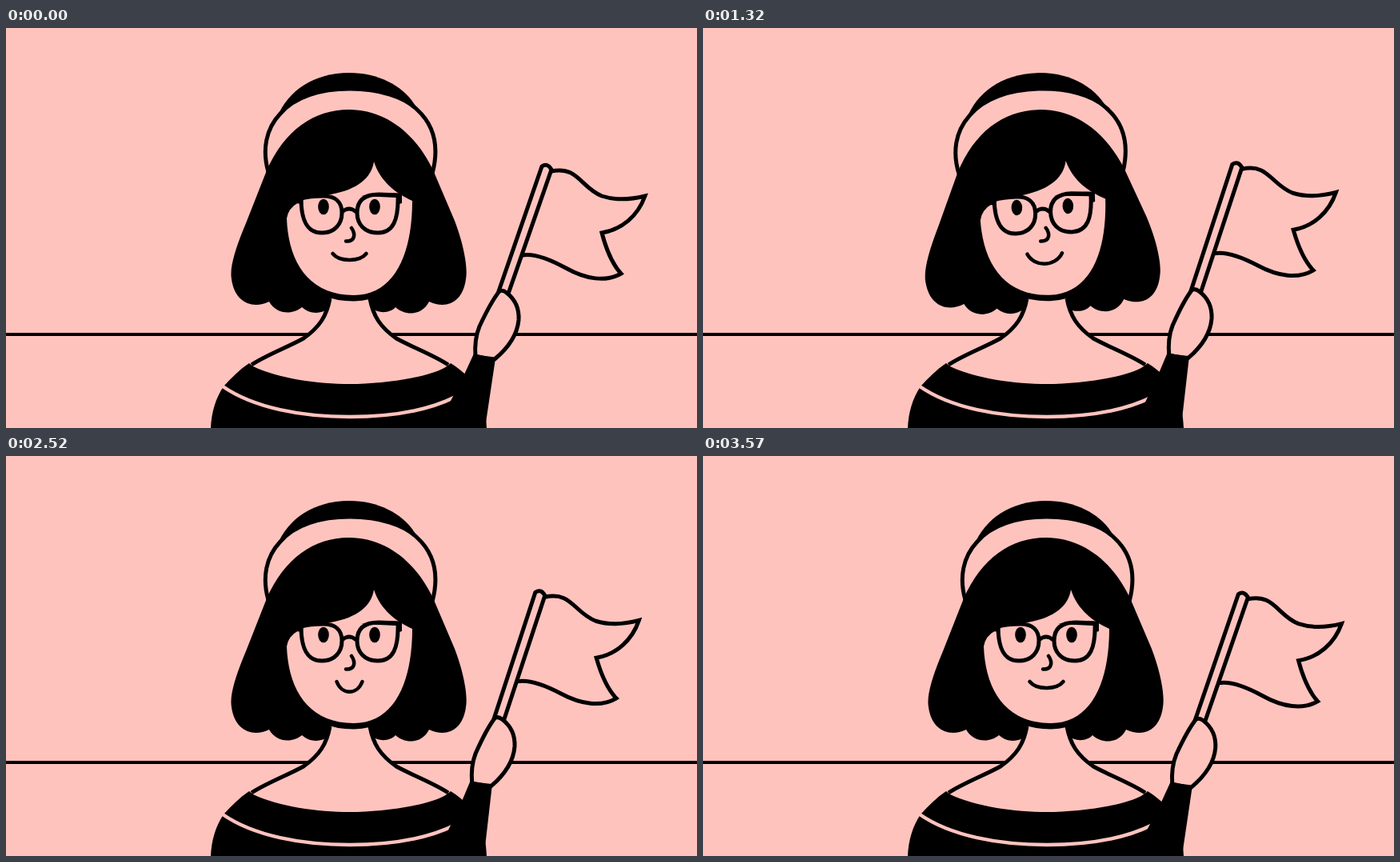
Animation of 864 by 500 pixels, one loop 3600 ms. Source, as an HTML page:

```html
<!DOCTYPE html>
<html lang="en">
<head>
<meta charset="utf-8">
<title>Waving a flag</title>
<style>
  html, body { margin: 0; width: 100%; height: 100%; overflow: hidden; background: #ffc3be; }
  svg { display: block; width: 864px; height: 500px; }
  .line { fill: none; stroke: #000; stroke-width: 5; }
  .skin { fill: #ffc3be; stroke: #000; stroke-width: 5; }
  .round { stroke-linecap: round; }
</style>
</head>
<body>
<svg viewBox="0 0 864 500">
  <path class="line" style="stroke-width:4" d="M0 383H864"/>

  <g class="head">
    <path d="M339 112C352 78 386 56 429 56S505 78 517 107L500 130H350Z"/>
    <path class="skin" d="M328 180C320 152 325 126 343 107C361 86 393 76 430 76S498 86 514 102C538 124 541 152 533 182Z"/>
    <path d="M326 178C348 128 385 102 429 102S512 130 535 180L561 241C571 267 578 298 575 314C571 343 551 352 529 342
      C520 360 499 360 487 349C480 357 465 357 457 350L430 336L404 350C394 358 380 358 370 349
      C358 359 338 358 329 342C308 352 286 343 282 314C279 298 289 270 300 244Z"/>
  </g>

  <path fill="#ffc3be" d="M405 338C401 360 392 374 372 388C350 400 325 409 307 421L430 450L553 421C535 409 510 400 488 388C468 374 459 360 455 338Z"/>
  <path class="line" d="M405 338C401 360 392 374 372 388C350 400 325 409 307 421M455 338C459 360 468 374 488 388C510 400 535 409 553 421"/>
  <path d="M304 419L309 423C340 438 390 445 430 445S530 437 551 423L556 419C590 440 600 468 601 500H256C257 480 262 463 272 448C282 437 292 427 304 419Z"/>
  <path fill="none" stroke="#ffc3be" stroke-width="4.5" d="M271 448C310 475 370 486 430 486S530 477 562 461"/>

  <g class="head">
    <g id="face">
      <path fill="#ffc3be" stroke="#000" stroke-width="15" paint-order="stroke"
        d="M366 218Q353 225 351 238C353 292 378 334 435 334C487 334 508 280 508 216C488 207 468 192 460 167C457 187 440 202 406 208L372 212Z"/>
      <path class="line" d="M369 213C369 240 376 256 395 256C411 256 420 245 420 231C420 218 412 210 397 210C386 210 376 211 369 213Z
        M490 209C491 240 484 256 465 256C448 256 439 245 439 231C439 216 448 208 466 208ZM420 230Q429 222 438 230"/>
      <path d="M444 210Q468 205 495 207V219L488 221V212ZM363 210L374 208L370 220L363 219Z"/>
      <ellipse cx="397" cy="223.5" rx="6.8" ry="9.8"/>
      <ellipse cx="461" cy="223.5" rx="6.8" ry="9.8"/>
    </g>
    <g id="mouth" class="line round" style="stroke-width:4.5">
      <path d="M432 250C437 257 437 267 425 266.5"/>
      <path id="smile"/>
    </g>
  </g>

  <g id="arm">
    <g id="hand">
      <path class="skin" d="M682 179C715 172 718 199 745 210C763 216 783 214 799 210C790 235 770 252 745 256C750 275 758 295 769 307C750 318 725 314 700 300C680 289 660 281 645 284"/>
      <path class="skin" d="M615 332L670 173Q677 168 682 177L627 335Z"/>
      <path class="skin" d="M617 329C608 340 599 358 592 373C587 385 586 398 587 411L611 414C623 404 639 387 641 365C642 349 635 338 626 331Q621 327 617 329Z"/>
    </g>
    <path d="M585 407L573 433L554 470L545 520H596L612 413Z"/>
  </g>
</svg>
<script>
const LOOP = 3600, SWING = 1200;
const byId = id => document.getElementById(id);
const heads = document.querySelectorAll('.head');

const smooth = p => p * p * (3 - 2 * p);

// Eased value at time t through [time, value] keys
function track(keys, t) {
  const next = keys.findIndex(key => key[0] > t);
  if (next < 0) return keys[keys.length - 1][1];
  const [t0, v0] = keys[next - 1], [t1, v1] = keys[next];
  return v0 + (v1 - v0) * smooth((t - t0) / (t1 - t0));
}

// The forearm swings about the elbow; the hand trails it about the wrist
const forearm = [[0, 0], [540, -15.3], [1200, 0]];
const wrist = [[0, 0], [330, 3.3], [900, -5.5], [1180, 0]];

const tilt = [[0, 0], [330, 0], [930, -2.4], [1180, -2.4], [1640, 0.35], [1980, 0]];
const smileWidth = [[0, 21], [450, 22], [1250, 22], [1950, 16], [2950, 16], [3500, 21]];
const smileDepth = [[0, 10.5], [450, 17], [2950, 17], [3500, 10.5]];

function draw(now) {
  const t = now % LOOP, swing = t % SWING;
  const angle = track(tilt, t), w = track(smileWidth, t), h = track(smileDepth, t);
  heads.forEach(head => head.setAttribute('transform', `rotate(${angle} 428 430)`));
  byId('face').setAttribute('transform', `translate(${-angle} 0)`);
  byId('mouth').setAttribute('transform', `translate(${-1.3 * angle} 0)`);
  byId('smile').setAttribute('d', `M${429.5 - w} 282c${w * 0.4} ${h} ${w * 1.6} ${h} ${w * 2} 0`);
  byId('arm').setAttribute('transform', `rotate(${track(forearm, swing)} 557 533)`);
  byId('hand').setAttribute('transform', `rotate(${track(wrist, swing)} 598 410)`);
  requestAnimationFrame(() => draw(performance.now()));
}
draw(performance.now());
</script>
</body>
</html>
```
